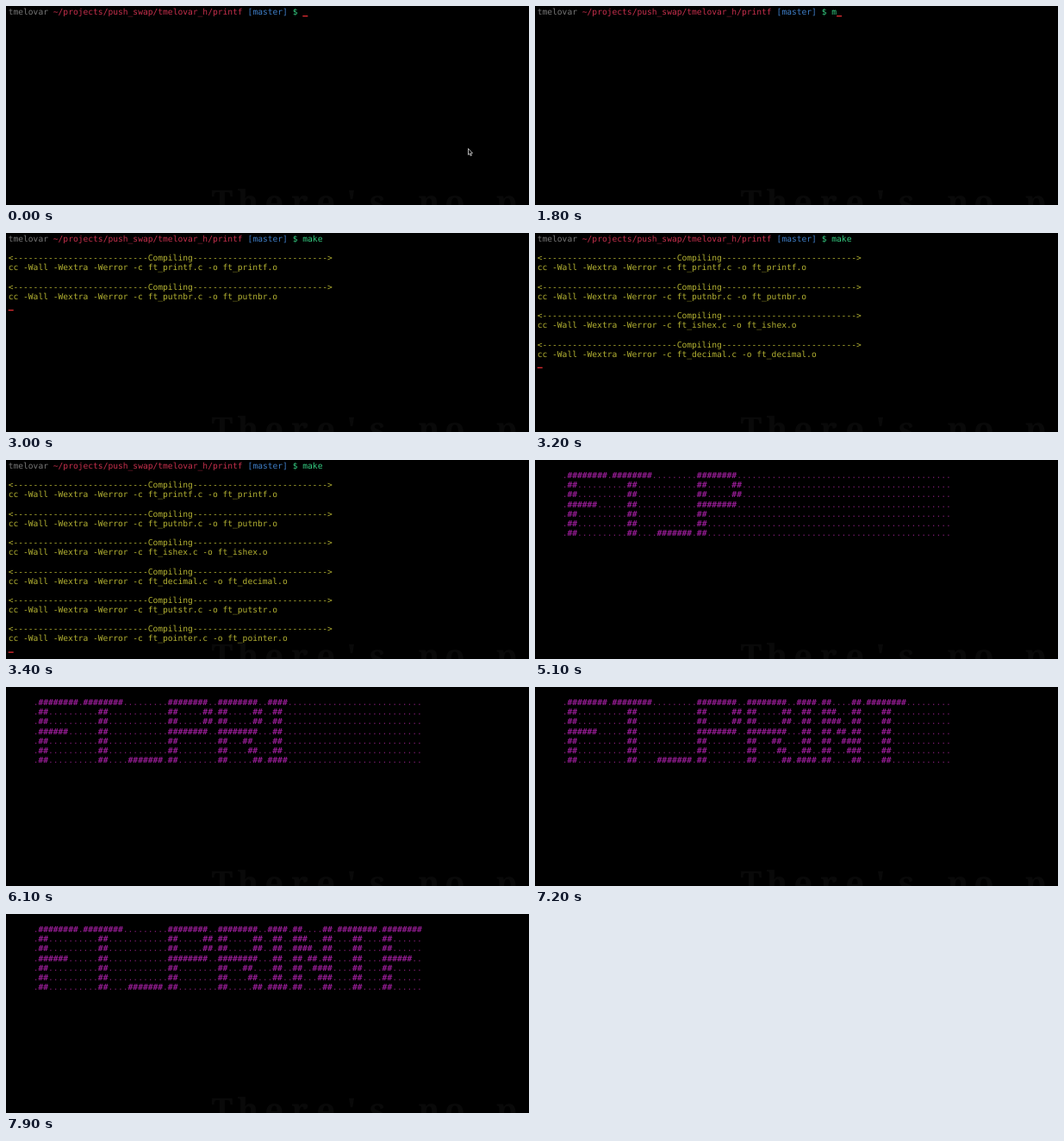
These frames come from a looping animation (607 px wide and 231 px high, 8000 ms). An HTML page:

```html
<!DOCTYPE html>
<html lang="en">
<head>
<meta charset="utf-8">
<title>Terminal</title>
<style>
  html, body { margin: 0; width: 100%; height: 100%; overflow: hidden; background: #000; }
  svg { display: block; }
  text { white-space: pre; text-rendering: geometricPrecision; }
  #screen { font: 9.62px "DejaVu Sans Mono", monospace; }
  #wall { font: bold 38px "Noto Serif", serif; fill: #090909; text-anchor: middle; }
  .user { fill: #777; }
  .path { fill: #c52f4c; }
  .branch { fill: #3f7fc9; }
  .input { fill: #35cf83; }
  .build { fill: #b4b232; }
  .ink { fill: #941c92; font-weight: bold; }
  .dot { fill: #761a6c; }
  .caret { fill: #d32a2f; }
  #mouse { animation: leave 8s step-end infinite; }
  @keyframes leave { 22.5%, 100% { visibility: hidden; } }
</style>
</head>
<body>
<svg width="607" height="231" viewBox="0 0 607 231">
  <text id="wall" y="241"></text>
  <g id="screen"></g>
  <path id="mouse" d="M536.5 165.5v7.3l1.6-1.5 1.1 2.6 1.2-.5-1.1-2.5h2.2z"
        fill="#000" stroke="#ddd" stroke-width=".8"/>
</svg>
<script>
const LOOP = 8000, LEFT = 2.7, CELL = 5.79, LINE = 11.13, BASE = 10.1;
const BUILD = 2900, BANNER = 3500;
const KEYS = [1800, 1900, 2100, 2200];
const REVEAL = [3500, 4000, 4600, 5100, 5600, 6100, 6700, 7200, 7700];
const FILES = ["printf", "putnbr", "ishex", "decimal", "putstr", "pointer"];

const F = ["########", "##......", "##......", "######..", "##......", "##......", "##......"];
const T = ["########", ...Array(6).fill("...##...")];
const U = [...Array(6).fill("......."), "#######"];
const P = ["########.", "##.....##", "##.....##", "########.", "##.......", "##.......", "##......."];
const R = [...P.slice(0, 4), "##...##..", "##....##.", "##.....##"];
const I = ["####", ...Array(5).fill(".##."), "####"];
const N = ["##....##", "###...##", "####..##", "##.##.##", "##..####", "##...###", "##....##"];
const WORD = [F, T, U, P, R, I, N, T, F];

const wall = document.getElementById("wall");
const ghost = "There's no p";
wall.setAttribute("x", [...ghost].map((_, i) => 251 + 30 * i).join(" "));
wall.textContent = ghost;

const put = (row, col, text, cls) =>
  `<text class="${cls}" x="${LEFT + col * CELL}" y="${BASE + row * LINE}">${text.replace(/</g, "&lt;")}</text>`;
const caret = (row, col) =>
  `<rect class="caret" x="${LEFT + col * CELL}" y="${11 + row * LINE}" width="6" height="1.4"/>`;
const passed = (times, t) => times.filter(at => t >= at).length;

function shell(t) {
  const typed = "make".slice(0, passed(KEYS, t));
  let out = put(0, 0, "tmelovar", "user")
    + put(0, 9, "~/projects/push_swap/tmelovar_h/printf", "path")
    + put(0, 48, "[master]", "branch")
    + put(0, 57, "$ " + typed, "input");
  if (t < BUILD) {
    const lit = t < 200 || (t >= 800 && t < 1300) || t >= KEYS[0];
    return lit ? out + caret(0, 59 + typed.length) : out;
  }
  const done = Math.min(FILES.length, Math.floor((t - BUILD) / 100) + 1);
  const rule = "-".repeat(27);
  FILES.slice(0, done).forEach((name, i) => {
    out += put(3 * i + 2, 0, `<${rule}Compiling${rule}>`, "build")
      + put(3 * i + 3, 0, `cc -Wall -Wextra -Werror -c ft_${name}.c -o ft_${name}.o`, "build");
  });
  return out + caret(3 * done + 1, 0);
}

function banner(t) {
  const shown = passed(REVEAL, t);
  return F.map((_, r) => {
    const line = "." + WORD.map((g, i) => i < shown ? g[r] : ".".repeat(g[r].length)).join(".");
    return put(r + 1, 5, line.replace(/#/g, " "), "dot")
      + put(r + 1, 5, line.replace(/\./g, " "), "ink");
  }).join("");
}

const screen = document.getElementById("screen");
let last = "";
function draw(now) {
  const t = now % LOOP;
  const next = t < BANNER ? shell(t) : banner(t);
  if (next !== last) screen.innerHTML = last = next;
  requestAnimationFrame(draw);
}
draw(0);
</script>
</body>
</html>
```
